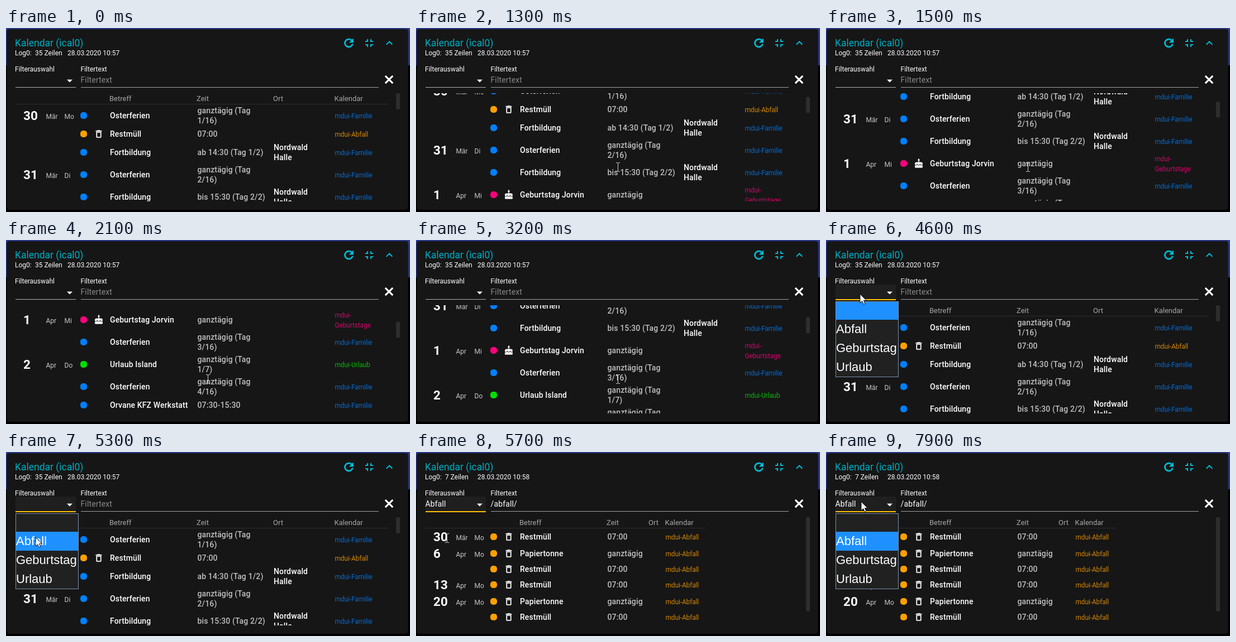
An HTML page that plays this animation: 723 by 330 pixels, repeating every 8000 ms.

```html
<!DOCTYPE html>
<html lang="de">
<head>
<meta charset="utf-8">
<title>Kalendar</title>
<style>
html, body { margin: 0; width: 100%; height: 100%; overflow: hidden; background: #000; }
svg { display: block; font: 14px Roboto, sans-serif; fill: #fff; }
.title { font-size: 17.5px; fill: #00acc1; }
.small { font-size: 12px; }
.field, .bold, .time { letter-spacing: .13px; }
.head { font-size: 13px; fill: #a8a8a8; }
.bold { font-weight: 500; }
.time { font-weight: 500; fill: #c0c0c0; }
.day { font-size: 22.5px; font-weight: 700; }
.date { font-size: 12px; fill: #c8c8c8; }
.cal { font-size: 12px; letter-spacing: -.15px; fill-opacity: .8; }
.option { font: 22px "Liberation Sans", Arial, sans-serif; }
.accent { fill: #00bcd4; }
</style>
</head>
<body>
<svg width="723" height="330" viewBox="0 0 723 330">
  <defs>
    <clipPath id="view"><rect x="16" y="117" width="690" height="194"/></clipPath>
    <filter id="shadow"><feDropShadow dx="0" dy="1" stdDeviation="2" flood-opacity=".7"/></filter>
    <path id="trash" d="M6 19A2 2 0 0 0 8 21H16A2 2 0 0 0 18 19V7H6ZM8 9H16V19H8ZM15.5 4L14.5 3H9.5L8.5 4H5V6H19V4Z"/>
    <path id="cake" d="M12 6A2 2 0 0 0 14 4C14 3.6 13.9 3.3 13.7 3L12 0L10.3 3C10.1 3.3 10 3.6 10 4A2 2 0 0 0 12 6M16.6 16L15.5 14.9L14.4 16C13.1 17.3 10.9 17.3 9.6 16L8.5 14.9L7.4 16C6.7 16.6 5.9 17 5 17C4.2 17 3.6 16.8 3 16.4V21A1 1 0 0 0 4 22H20A1 1 0 0 0 21 21V16.4C20.4 16.8 19.8 17 19 17C18.1 17 17.2 16.6 16.6 16M18 9H13V7H11V9H6A3 3 0 0 0 3 12V13.5C3 14.6 3.9 15.5 5 15.5C5.5 15.5 6 15.3 6.3 14.9L8.5 12.8L10.6 14.9C11.3 15.7 12.6 15.7 13.4 14.9L15.5 12.8L17.6 14.9C18 15.3 18.5 15.5 19 15.5C20.1 15.5 21 14.6 21 13.5V12A3 3 0 0 0 18 9Z"/>
  </defs>
  <rect width="723" height="67" fill="#303f9f"/>
  <rect x="1.5" y="2" width="718" height="324" rx="4" fill="#121212" filter="url(#shadow)"/>

  <text class="title" x="16" y="33">Kalendar (ical0)</text>
  <text class="small" x="16" y="49">Log0:</text>
  <text class="small" x="52" y="49" id="count"></text>
  <text class="small" x="110" y="49" id="stamp"></text>
  <g class="accent">
    <path transform="translate(601.5 15)" stroke="#00bcd4" stroke-width=".9" d="M17.65 6.35C16.2 4.9 14.2 4 12 4A8 8 0 0 0 12 20C15.7 20 18.8 17.5 19.7 14H17.65C16.8 16.3 14.6 18 12 18A6 6 0 0 1 12 6C13.7 6 15.1 6.7 16.2 7.8L13 11H20V4Z"/>
    <path transform="translate(638 15)" d="M14 14H19V16H16V19H14ZM5 14H10V19H8V16H5ZM8 5H10V10H5V8H8ZM19 8V10H14V5H16V8Z"/>
    <path transform="translate(674 15)" d="M7.4 15.4L12 10.8L16.6 15.4L18 14L12 8L6 14Z"/>
  </g>

  <rect id="focusFill" x="17" y="80" width="108" height="27" fill="#1f1f1f"/>
  <text class="small" x="16" y="78">Filterauswahl</text>
  <text class="small" x="133.5" y="78">Filtertext</text>
  <text class="field" x="16.5" y="98" id="choice"></text>
  <text class="field" x="133.5" y="98" id="query"></text>
  <path d="M109 92.5H119L114 97.5Z"/>
  <rect id="underline" x="17" width="108"/>
  <rect x="134" y="106" width="533" height="1" fill="#a0a0a0"/>
  <path transform="translate(673.5 80.5)" stroke="#fff" stroke-width="1.1" d="M19 6.4L17.6 5L12 10.6L6.4 5L5 6.4L10.6 12L5 17.6L6.4 19L12 13.4L17.6 19L19 17.6L13.4 12Z"/>

  <g clip-path="url(#view)">
    <g id="full"></g>
    <g id="filtered"></g>
    <rect id="thumb" x="698" width="7" rx="3" fill="#2e2e2e"/>
  </g>

  <g id="menu">
    <rect x="17.5" y="110.5" width="112" height="135" fill="#212121" stroke="#7d8fae"/>
    <rect id="highlight" x="18" width="111" fill="#1e90ff"/>
    <g class="option">
      <text x="18" y="167">Abfall</text>
      <text x="18" y="201">Geburtstag</text>
      <text x="18" y="235">Urlaub</text>
    </g>
  </g>
  <path id="arrow" stroke="#000" stroke-width=".9" d="M0 0V16L3.7 12.6L6.2 18.2L8.8 17L6.4 11.6H11.3Z"/>
  <path id="beam" fill="none" stroke="#d8d8d8" d="M-3 -7.5H-1L.5 -6.5L2 -7.5H4M.5 -7V8M-3 8.5H-1L.5 7.5L2 8.5H4"/>
</svg>
<script>
const $ = id => document.getElementById(id);
const BLUE = '#0080ff', ORANGE = '#ffa000', PINK = '#ff0080', GREEN = '#00e000';

const text = (x, y, cls, str, fill) =>
  `<text x="${x}" y="${y}" class="${cls}"${fill ? ` style="fill:${fill}"` : ''}>${str}</text>`;

// A "|" in a cell breaks it into two lines around the row centre.
function cell(x, cy, cls, str, fill) {
  const lines = str.split('|');
  return lines.map((line, i) =>
    text(x, cy + 5 + 18 * i - 9 * (lines.length - 1), cls, line, fill)).join('');
}

// Each row: date, colour, icon, subject, time, place, calendar
function buildTable(id, rows, placeX, calX, right) {
  let top = 137;
  let out = text(185, 131, 'head', 'Betreff') + text(341, 131, 'head', 'Zeit') +
    text(placeX - 1, 131, 'head', 'Ort') + text(calX - 1, 131, 'head', 'Kalendar') +
    `<rect x="17" y="136" width="${right - 17}" height="1" fill="#2d2d2d"/>`;
  for (const [date, color, icon, subject, time, place, cal] of rows) {
    const height = (time + place + cal).includes('|') ? 40 : date ? 30 : 26;
    const cy = top + height / 2;
    top += height;
    if (date) {
      const [day, month, weekday] = date.split(' ');
      out += text(31, cy + 8, 'day', day) + text(71.5, cy + 6, 'date', month) +
        text(104.5, cy + 6, 'date', weekday);
    }
    out += `<rect x="133" y="${cy - 6}" width="12" height="12" rx="5" fill="${color}"/>`;
    if (icon) {
      out += `<use href="#${icon}" transform="translate(157 ${cy - 9}) scale(.75)" stroke="#fff" stroke-width=".4"/>`;
    }
    out += cell(186, cy, 'bold', subject) + cell(342.5, cy, 'time', time) +
      cell(placeX, cy, 'bold', place) + cell(calX, cy, 'cal', 'mdui-' + cal, color);
  }
  $(id).innerHTML = out;
}

const holiday = (date, n) => [date, BLUE, '', 'Osterferien', `ganztägig (Tag|${n}/16)`, '', 'Familie'];
const training = time => ['', BLUE, '', 'Fortbildung', time, 'Nordwald|Halle', 'Familie'];
const waste = (date, subject = 'Restmüll', time = '07:00') =>
  [date, ORANGE, 'trash', subject, time, '', 'Abfall'];
const paper = date => waste(date, 'Papiertonne', 'ganztägig');

buildTable('full', [
  holiday('30 Mär Mo', 1),
  waste(''),
  training('ab 14:30 (Tag 1/2)'),
  holiday('31 Mär Di', 2),
  training('bis 15:30 (Tag 2/2)'),
  ['1 Apr Mi', PINK, 'cake', 'Geburtstag Jorvin', 'ganztägig', '', '|Geburtstage'],
  holiday('', 3),
  ['2 Apr Do', GREEN, '', 'Urlaub Island', 'ganztägig (Tag|1/7)', '', 'Urlaub'],
  holiday('', 4),
  ['', BLUE, '', 'Orvane KFZ Werkstatt', '07:30-15:30', '', 'Familie'],
], 479, 588.5, 685);

buildTable('filtered', [
  waste('30 Mär Mo'), paper('6 Apr Mo'), waste(''),
  waste('13 Apr Mo'), paper('20 Apr Mo'), waste(''),
], 417, 446.5, 519);

// Time, scroll offset
const scrollSteps = [[0, 0], [1300, 44], [1400, 90], [1500, 100], [2000, 150], [2100, 200],
  [3200, 145], [3300, 40], [3400, 0]];
// Start, end, target of each pointer move
const moves = [[200, 500, 361, 249], [3700, 4500, 61, 97], [4800, 5100, 53, 151],
  [5200, 5300, 53, 153], [5400, 5500, 55, 153.5], [6600, 7000, 63, 89]];

function pointer(t) {
  let x = 597, y = 92;
  for (const [start, end, toX, toY] of moves) {
    const p = Math.min(1, Math.max(0, (t - start) / (end - start)));
    const eased = p * p * (3 - 2 * p);
    x += (toX - x) * eased;
    y += (toY - y) * eased;
  }
  return [x, y];
}

const show = (id, on) => $(id).setAttribute('visibility', on ? 'visible' : 'hidden');
function set(id, attrs) {
  for (const name in attrs) $(id).setAttribute(name, attrs[name]);
}

function render(t) {
  const scroll = scrollSteps.findLast(([start]) => start <= t)[1];
  const [x, y] = pointer(t);
  const focused = t >= 4500, chosen = t >= 5500, loaded = t >= 5700;
  const onWaste = chosen || y > 143;

  $('count').textContent = loaded ? '7 Zeilen' : '35 Zeilen';
  $('stamp').textContent = '28.03.2020 10:5' + (loaded ? 8 : 7);
  $('choice').textContent = chosen ? 'Abfall' : '';
  $('query').textContent = t >= 5600 ? '/abfall/' : 'Filtertext';
  set('query', { fill: t >= 5600 ? '#fff' : '#8a8a8a' });
  show('focusFill', focused);
  set('underline', focused ? { y: 106, height: 2, fill: '#ffc107' } : { y: 106, height: 1, fill: '#b0b0b0' });

  show('full', !loaded);
  show('filtered', loaded);
  set('full', { transform: `translate(0 ${-scroll})` });
  set('thumb', { y: 117 + scroll * .147, height: loaded ? 169 : 29 });

  const open = (t >= 4600 && !chosen) || t >= 7900;
  show('menu', open);
  set('highlight', onWaste ? { y: 143, height: 34 } : { y: 111, height: 32 });

  const arrow = (t >= 3800 && !chosen) || t >= 6700;
  show('arrow', arrow);
  show('beam', t >= 200 && !arrow);
  const place = { transform: `translate(${Math.round(x)} ${Math.round(y)})` };
  set('arrow', place);
  set('beam', place);
}

function tick() {
  render(Math.floor(performance.now() % 8000 / 100) * 100);
  requestAnimationFrame(tick);
}
tick();
</script>
</body>
</html>
```
